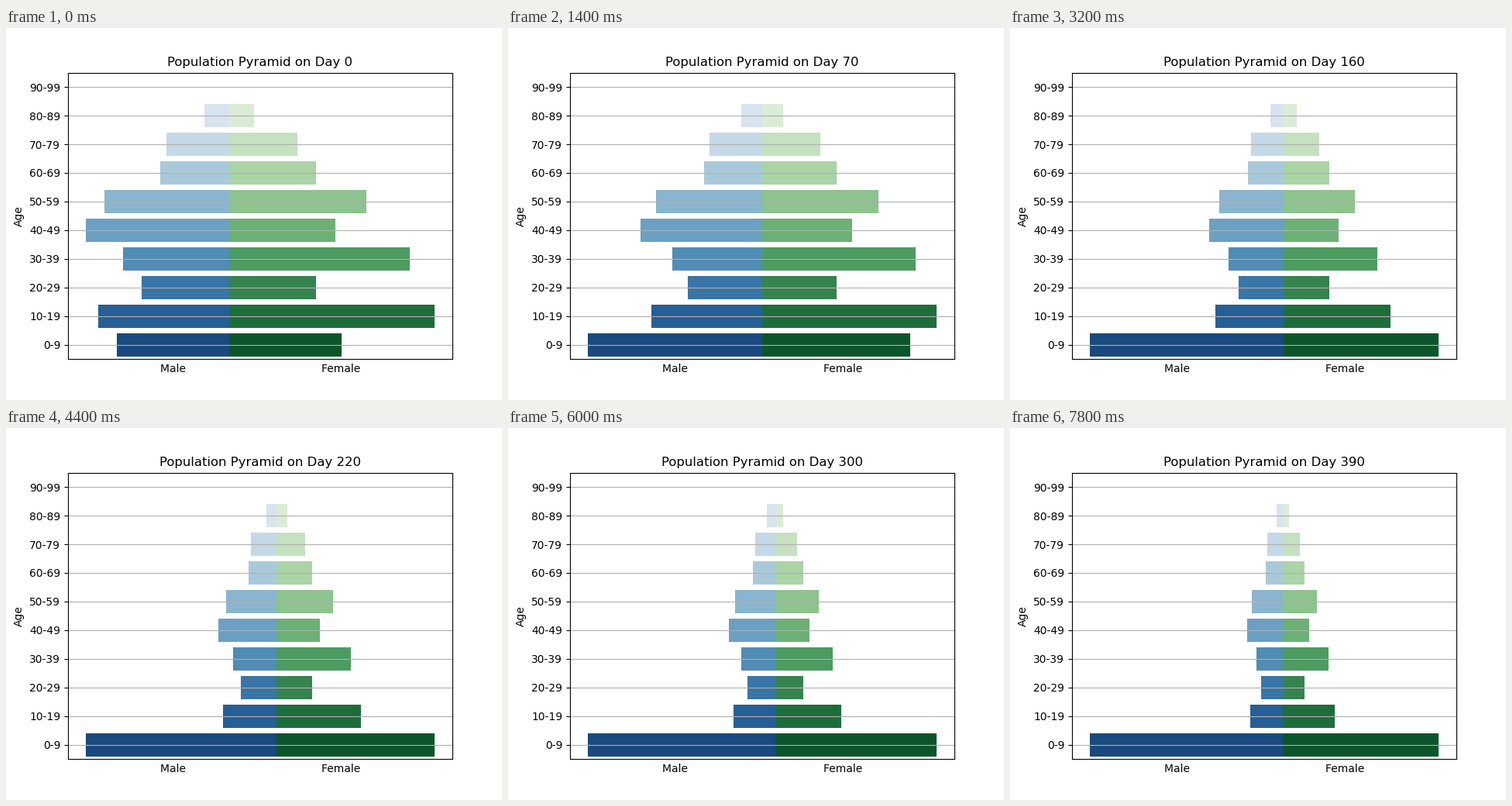
A matplotlib script for the animation above (8 s loop, 640 px wide and 480 px high).

```python
import colorsys

import numpy as np
import matplotlib.pyplot as plt
from matplotlib.animation import FuncAnimation

FRAMES, INTERVAL = 40, 200
DAYS_PER_FRAME = 10
AGES = [f"{a}-{a + 9}" for a in range(0, 100, 10)]

# Starting population per age group, youngest first.
MALE = [18, 21, 14, 17, 23, 20, 11, 10, 4, 0]
FEMALE = [18, 33, 14, 29, 17, 22, 14, 11, 4, 0]

# Births only enlarge the youngest group, at a steady rate between key days.
KEY_DAYS = [0, 70, 120, 160, 300, 390]
BOYS = [18, 33, 46, 60, 94, 124]
GIRLS = [18, 28, 39, 48, 81, 100]


def muted(rgba, saturation=0.75):
    h, l, s = colorsys.rgb_to_hls(*rgba[:3])
    return colorsys.hls_to_rgb(h, l, s * saturation)


def palette(name):
    steps = np.linspace(0, 1, len(AGES) + 2)[1:-1]
    return [muted(c) for c in plt.get_cmap(name)(steps)]


def youngest(day, counts):
    return round(float(np.interp(day, KEY_DAYS, counts)))


fig, ax = plt.subplots(figsize=(6.4, 4.8), dpi=100)
male_bars = ax.barh(AGES, np.negative(MALE), color=palette("Blues_r"))
female_bars = ax.barh(AGES, FEMALE, color=palette("Greens_r"))
ax.set_ylim(-0.5, len(AGES) - 0.5)
ax.set_xticks([])
ax.tick_params(axis="y", pad=3.56)
ax.grid(axis="y")
ax.set_xlabel("Male" + " " * 40 + "Female")
ax.set_ylabel("Age", labelpad=4.36)
title = ax.set_title("", fontsize=11.87)


def draw(i):
    day = i * DAYS_PER_FRAME
    boys, girls = youngest(day, BOYS), youngest(day, GIRLS)
    male_bars[0].set_width(-boys)
    female_bars[0].set_width(girls)

    left, right = max(boys, *MALE), max(girls, *FEMALE)
    margin = 0.05 * (left + right)
    ax.set_xlim(-left - margin, right + margin)
    title.set_text(f"Population Pyramid on Day {day}")
    return [*male_bars, *female_bars, title]


anim = FuncAnimation(fig, draw, frames=FRAMES, interval=INTERVAL,
                     repeat=True, repeat_delay=0, blit=False)
plt.show()
```
